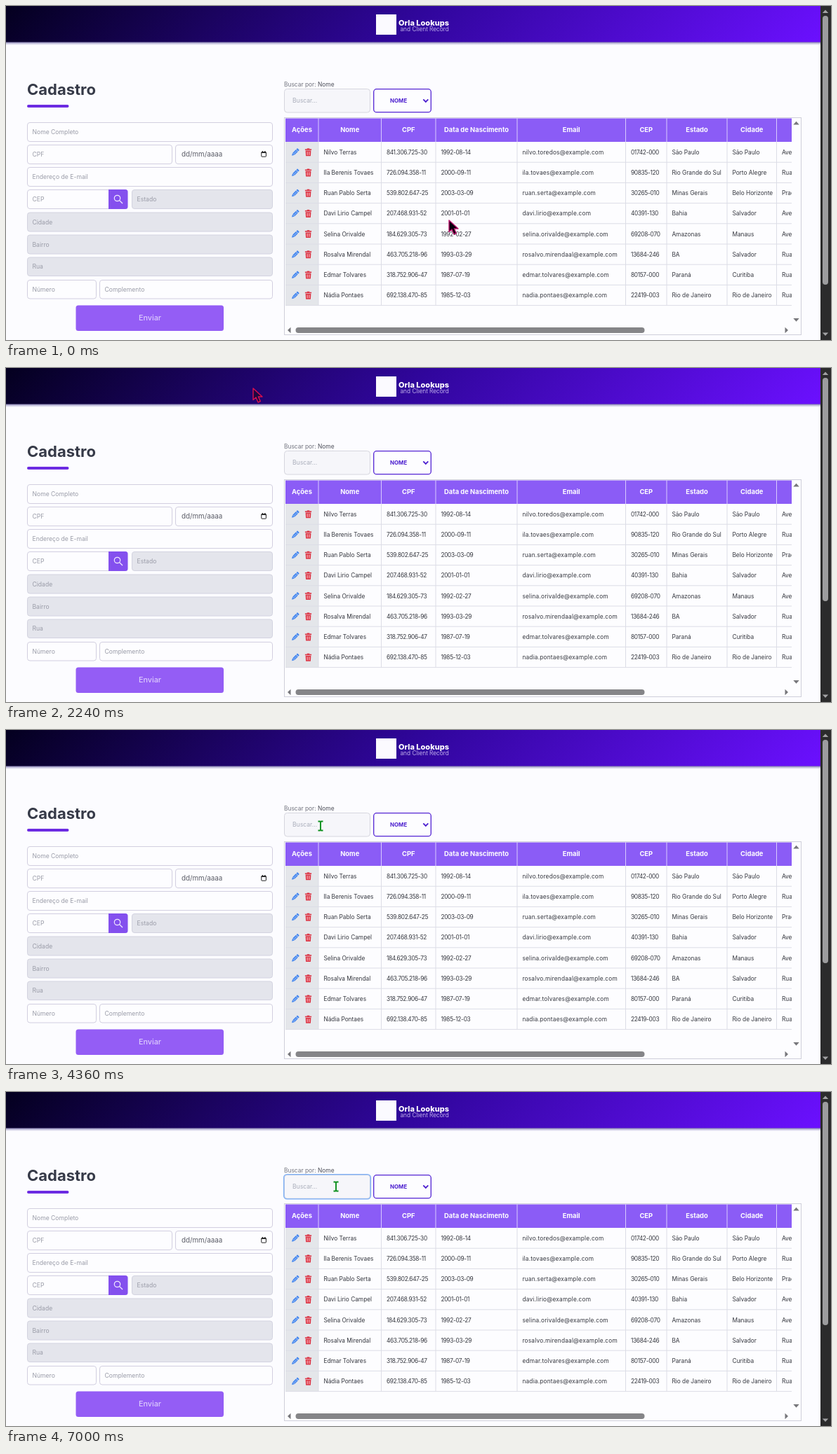
These frames come from a looping animation (1175x477 px, 8 s). An HTML page:

```html
<!DOCTYPE html>
<html lang="pt-BR">
<head>
<meta charset="utf-8">
<title>Cadastro</title>
<style>
  html, body { margin: 0; width: 100%; height: 100%; overflow: hidden; background: #fcfcff; }
  svg { display: block; width: 1175px; height: 477px; font-family: Inter, "Open Sans", sans-serif; }
  text { white-space: pre; }
  .hint { font-size: 8.6px; fill: #9a9ca8; }
  .th { font-size: 9.4px; font-weight: 700; fill: #fff; text-anchor: middle; }
  .td { font-size: 8.3px; fill: #34363e; }
  .num { letter-spacing: -.3px; }
  .mail { letter-spacing: .2px; }
</style>
</head>
<body>
<svg id="stage" viewBox="0 0 1175 477" xmlns="http://www.w3.org/2000/svg"></svg>
<script>
const LOOP = 8000;
const PURPLE = '#8b5cf6';
const stage = document.getElementById('stage');

const rect = (x, y, w, h, fill, extra = '') =>
  `<rect x="${x}" y="${y}" width="${w}" height="${h}" fill="${fill}" ${extra}/>`;
const text = (x, y, str, cls = '', extra = '') =>
  `<text x="${x}" y="${y}" class="${cls}" ${extra}>${str}</text>`;
const path = (d, extra) => `<path d="${d}" ${extra}/>`;
const line = (d, color, width = 1) =>
  path(d, `fill="none" stroke="${color}" stroke-width="${width}"`);

function field(x, y, right, bottom, label, off) {
  return rect(x + .5, y + .5, right - x - 1, bottom - y - 1, off ? '#e4e5ec' : '#fdfdff',
      `rx="3.5" stroke="${off ? '#d3d3e0' : '#d2cfe0'}"`) +
    text(x + 7.5, (y + bottom) / 2 + 3, label, 'hint');
}

function banner() {
  return `<defs>
      <linearGradient id="night" gradientUnits="userSpaceOnUse" x1="277" y1="-277" x2="883" y2="328">
        <stop offset="0" stop-color="#04001f"/><stop offset=".5" stop-color="#30069c"/>
        <stop offset="1" stop-color="#6b10ff"/>
      </linearGradient>
      <linearGradient id="shade" x1="0" y1="0" x2="0" y2="1">
        <stop offset="0" stop-color="#40367c" stop-opacity=".75"/><stop offset="1" stop-color="#8a86c8" stop-opacity="0"/>
      </linearGradient>
      <clipPath id="cells"><rect x="397" y="160" width="722" height="270"/></clipPath>
    </defs>` +
    rect(0, 51, 1160, 5, 'url(#shade)') +
    rect(0, 0, 1160, 51.5, 'url(#night)') +
    rect(527, 12, 29, 29, '#fbfaff') +
    text(559, 27.5, 'Orla Lookups', '', 'font-size="11" font-weight="800" fill="#fff"') +
    text(561.5, 36.3, 'and Client Record', '', 'font-size="8.4" font-weight="300" fill="#e4dcff"');
}

function form() {
  return text(30, 127, 'Cadastro', '', 'font-size="22" font-weight="700" fill="#363a48"') +
    rect(30, 141, 59.5, 4, '#6c2be2', 'rx="2"') +
    field(30, 166, 380, 194, 'Nome Completo') +
    field(30, 198, 237, 226, 'CPF') +
    field(241, 198, 380, 226, '') +
    text(250, 215, 'dd/mm/aaaa', '', 'font-size="9.8" fill="#5c5e68"') +
    rect(363.8, 208.6, 6.6, 6.6, 'none', 'stroke="#222" rx=".6"') +
    line('M363.5 209.5H370.7M365.3 207V209M368.9 207V209', '#222', 1.2) +
    field(30, 230, 380, 258, 'Endereço de E-mail') +
    field(30, 262, 150, 290, 'CEP') +
    path('M146 262H170Q173.500 262 173.500 265.500V286.500Q173.500 290 170 290H146Z', 'fill="#8450ee"') +
    '<circle cx="158.500" cy="274.500" r="4.200" fill="none" stroke="#f0e8ff" stroke-width="1.200"/>' +
    line('M161.6 277.6L166 282', '#f0e8ff', 1.3) +
    field(179, 262, 380, 290, 'Estado', true) +
    field(30, 294.5, 380, 322.5, 'Cidade', true) +
    field(30, 326.5, 380, 354.5, 'Bairro', true) +
    field(30, 358.5, 380, 386, 'Rua', true) +
    field(30, 391, 129, 418.5, 'Número') +
    field(133, 391, 380, 418.5, 'Complemento') +
    rect(99.5, 427.5, 210.5, 36.5, '#945df5', 'rx="3.5"') +
    text(205, 449, 'Enviar', '', 'font-size="10.8" font-weight="500" fill="#dccbfd" text-anchor="middle"');
}

function search() {
  return `<text x="396" y="115.3" font-size="8.4" fill="#70727c">Buscar por: <tspan fill="#4c4e58">Nome</tspan></text>` +
    rect(396.5, 118.5, 122, 33.5, '#f6f6fa', 'id="box" rx="4" stroke="#d6d6de"') +
    rect(395.7, 117.7, 123.600, 35, 'none', 'id="focus" rx="4.500" stroke="#86b4f6" stroke-width="1.600"') +
    text(408, 138.3, 'Buscar...', 'hint', 'style="fill:#a9adba"') +
    rect(408, 130, 1, 11, '#333', 'id="caret"') +
    rect(523.7, 118.7, 81.6, 33, '#fdfdff', 'rx="4" stroke="#5425d4" stroke-width="1.300"') +
    text(547, 138, 'NOME', '', 'font-size="7.9" font-weight="700" fill="#4d20cf"') +
    line('M594.3 133.300L597.800 136.900L601.300 133.300', '#4d20cf', 1.8);
}

const COLS = [445, 534.5, 612, 728, 882.5, 941, 1027, 1097.5];
const HEADS = ['Ações', 'Nome', 'CPF', 'Data de Nascimento', 'Email', 'CEP', 'Estado', 'Cidade'];
const CLASSES = ['', 'num', 'num', 'mail', 'num', '', '', ''];
const PEOPLE = [
  'Nilvo Terras|841.306.725-30|1992-08-14|nilvo.toredos|01742-000|São Paulo|São Paulo|Avenida',
  'Ila Berenis Tovaes|726.094.358-11|2000-09-11|ila.tovaes|90835-120|Rio Grande do Sul|Porto Alegre|Rua',
  'Ruan Pablo Serta|539.802.647-25|2003-03-09|ruan.serta|30265-010|Minas Gerais|Belo Horizonte|Praça',
  'Davi Lirio Campel|207.468.931-52|2001-01-01|davi.lirio|40391-130|Bahia|Salvador|Avenida',
  'Selina Orivalde|184.629.305-73|1992-02-27|selina.orivalde|69208-070|Amazonas|Manaus|Avenida',
  'Rosalva Mirendal|463.705.218-96|1993-03-29|rosalvo.mirendaal|13684-246|BA|Salvador|Rua',
  'Edmar Tolvares|318.752.906-47|1987-07-19|edmar.tolvares|80157-000|Paraná|Curitiba|Rua',
  'Nádia Pontaes|692.138.470-85|1985-12-03|nadia.pontaes|22419-003|Rio de Janeiro|Rio de Janeiro|Rua'
].map(row => row.split('|'));

const pencil = y => `<g transform="translate(412 ${y}) rotate(45)">` +
  rect(-2, -6.3, 4, 2.300, '#4486ee', 'rx=".8"') +
  rect(-2, -3.4, 4, 6.6, '#4486ee') +
  path('M-2 3.600H2L0 7Z', 'fill="#4486ee"') +
  line('M.2 -2.600V2.600', '#b4d2ff', .8) + '</g>';

const bin = y => `<g transform="translate(430.500 ${y})">` +
  rect(-4.6, -4.6, 9.2, 1.6, '#dc3545') + rect(-1.8, -5.6, 3.6, 1.5, '#dc3545') +
  path('M-3.900 -2.300H3.900L3.400 5.400H-3.400Z', 'fill="#dc3545"') +
  line('M-1.400 -.8V4M1.400 -.8V4', '#ffe4e6', .9) + '</g>';

function table() {
  const pitch = 29.2, top = 194, bottom = top + pitch * 8;
  let out = rect(396.5, 159.5, 736, 310, '#fdfdff', 'stroke="#cfcfda"') +
    '<g clip-path="url(#cells)">' +
    rect(398, 160.5, 721, 33.5, PURPLE) +
    rect(398, top, 47, bottom - top, '#e4e6ea');
  HEADS.forEach((head, i) => {
    const left = i ? COLS[i - 1] : 398;
    out += text((left + COLS[i]) / 2, 180, head, 'th');
  });
  PEOPLE.forEach((row, r) => {
    const mid = top + pitch * (r + .5) + .3;
    out += pencil(mid) + bin(mid);
    row.forEach((cell, c) => {
      const value = c === 3 ? cell + '@example.com' : cell;
      out += text(COLS[c] + 7.4, mid + 2.9, value, 'td ' + CLASSES[c]);
    });
    out += line(`M398 ${top + pitch * (r + 1)}H1119`, '#dcdde6');
  });
  COLS.forEach(x => {
    out += line(`M${x} 160V194`, '#d9caff') + line(`M${x} 194V${bottom}`, '#dcdde6');
  });
  return out + '</g>' +
    rect(412.5, 459, 497, 8, '#858588', 'rx="4"') +
    path('M1121.300 169.500H1129.700L1125.500 164.800ZM1121.300 446H1129.700L1125.500 450.700Z' +
      'M405.500 458.800V467.200L401 463ZM1109.500 458.800V467.200L1114 463Z', 'fill="#77777b"');
}

function pageBar() {
  return rect(1160, 0, 15, 477, '#2b2b2c') +
    rect(1163, 14, 8, 384, '#9c9c9e', 'id="thumb" rx="4"') +
    path('M1162.800 10H1171.200L1167 5.500ZM1162.800 466.500H1171.200L1167 471Z', 'fill="#a2a2a4"');
}

function pointers() {
  return path('M0 0V16.500L4 13L7 20L10.300 18.500L7.400 12H13Z',
      'id="arrow" stroke-width="1.400" stroke-linejoin="round"') +
    `<g id="beam">${line('M-3.500 -6.500H-1L0 -5.700L1 -6.500H3.500M-3.500 6.500H-1L0 5.700L1 6.500H3.500M0 -6V6', '#0c8f1c', 1.9)}</g>`;
}

stage.innerHTML = banner() + form() + search() + table() + pageBar() + pointers();

// time, x, y
const MOVES = [
  [0, 631, 306], [140, 618, 288], [260, 575, 241],
  [400, 510, 178], [480, 443, 122], [560, 374, 72], [640, 312, 33], [740, 256, 8], [820, 231, -1],
  [2240, 352, 29], [2360, 368, 47], [2420, 380, 61], [2500, 391, 74], [2540, 395, 80],
  [2680, 404, 93], [2760, 412, 104], [2840, 419, 114], [2920, 426, 123], [3000, 431, 130], [3100, 435, 135],
  [3240, 437, 138], [3360, 442, 148], [3480, 446, 156],
  [4200, 452, 149], [4220, 447, 138], [4360, 448, 137], [4480, 445, 142],
  [6300, 449, 142], [6400, 454, 136], [6500, 458, 128], [6600, 461, 121], [6700, 460, 117], [6840, 470, 135]
];
// time, visible
const BLINK = [[0, 0], [5480, 1], [6300, 0], [6500, 1], [7000, 0]];
const FOCUS_AT = 5480, BEAM_AT = 2840, THUMB_AT = 400;

const held = (steps, t) => steps.reduce((last, step) => step[0] <= t ? step : last);
const part = id => document.getElementById(id);
const [arrow, beam, caret, focus, thumb] = ['arrow', 'beam', 'caret', 'focus', 'thumb'].map(part);
const show = (el, on) => el.setAttribute('visibility', on ? 'visible' : 'hidden');

function draw(now) {
  const t = now % LOOP;
  const [, x, y] = held(MOVES, t);
  const isBeam = t >= BEAM_AT;
  const dark = y < 45;
  (isBeam ? beam : arrow).setAttribute('transform', `translate(${x} ${y})`);
  show(beam, isBeam);
  show(arrow, !isBeam);
  arrow.setAttribute('fill', dark ? '#1e0640' : '#09000c');
  arrow.setAttribute('stroke', dark ? '#d80f50' : '#b8146c');
  show(focus, t >= FOCUS_AT);
  show(caret, held(BLINK, t)[1]);
  thumb.setAttribute('height', t < THUMB_AT ? 384 : 319);
}

function tick() {
  draw(performance.now());
  requestAnimationFrame(tick);
}
tick();
</script>
</body>
</html>
```
